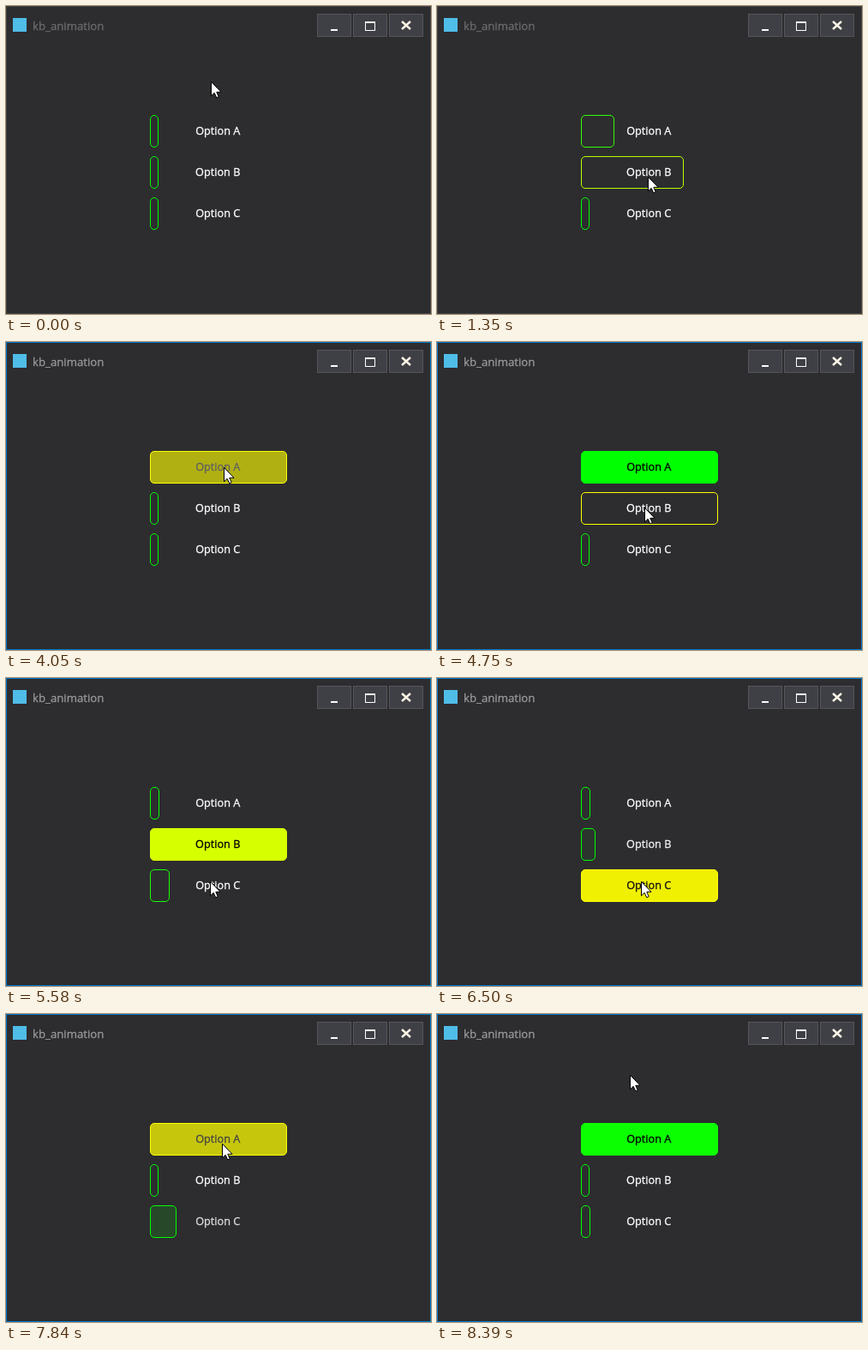
Animation, 496 px wide and 359 px high, one loop 8.62 s. Source, as an HTML page with a canvas:

```html
<!DOCTYPE html>
<html lang="en">
<head>
<meta charset="utf-8">
<title>kb_animation</title>
<style>
html, body { margin: 0; width: 100%; height: 100%; overflow: hidden; background: #2d2d30; }
canvas { display: block; width: 496px; height: 359px; }
</style>
</head>
<body>
<canvas id="stage"></canvas>
<script>
const W = 496, H = 359, LOOP = 8620, LAST_CHANGE = 8390, ACTIVATED = 3670;
const LEFT = 168, TOP = 127, PITCH = 48, BOX_H = 38;
const CLOSED = 10, OPEN = 160;
const HOVER = 350, UNCHECK = 460, FILL = 400, TINT = 450;
const FONT = '"Open Sans", "Noto Sans", sans-serif';

const canvas = document.getElementById('stage');
const ctx = canvas.getContext('2d');
const dpr = window.devicePixelRatio || 1;
canvas.width = W * dpr;
canvas.height = H * dpr;

const clamp = v => Math.max(0, Math.min(1, v));
const mix = (a, b, u) => a + (b - a) * u;
const easeOut = u => 1 - (1 - u) * (1 - u);
const smooth = u => u * u * (3 - 2 * u);
const progress = (t, start, span) => clamp((t - start) / span);

const moves = [
  { from: 50, to: 595, x: 245, y: 150 },
  { from: 1076, to: 1284, x: 247, y: 199 },
  { from: 1790, to: 2210, x: 249, y: 255 },
  { from: 2600, to: 3010, x: 255, y: 146 },
  { from: 4214, to: 4534, x: 243, y: 193 },
  { from: 5533, to: 5583, x: 239, y: 237 },
  { from: 6530, to: 6916, x: 253, y: 151 },
  { from: 7900, to: 8300, x: 226, y: 71 }
];

const clicks = [
  { time: 3802, index: 0 },
  { time: 5000, index: 1 },
  { time: 6130, index: 2 },
  { time: 7550, index: 0 }
];

const options = ['A', 'B', 'C'].map((letter, i) => ({
  label: `Option ${letter}`, y: TOP + i * PITCH, open: false, checked: false, resizes: []
}));

function pointerAt(t) {
  let x = 240, y = 88;
  for (const move of moves) {
    const u = smooth(progress(t, move.from, move.to - move.from));
    x = mix(x, move.x, u);
    y = mix(y, move.y, u);
  }
  return { x, y };
}

// Derive when each box opens and closes from the pointer and the clicks
function recordResizes() {
  for (let t = 0; t < LOOP; t += 2) {
    const { y } = pointerAt(t);
    const click = clicks.findLast(c => c.time <= t);
    options.forEach((option, i) => {
      const checked = click?.index === i;
      const hovered = y >= option.y && y < option.y + BOX_H;
      const open = checked || hovered;
      if (open !== option.open) {
        const unchecked = option.checked && !checked;
        option.resizes.push({
          time: t,
          width: open ? OPEN : unchecked ? CLOSED + 1 : CLOSED,
          span: unchecked ? UNCHECK : HOVER
        });
      }
      Object.assign(option, { open, checked });
    });
  }
}

function widthAt(resizes, t) {
  let width = CLOSED;
  resizes.forEach(({ time, width: end, span }, i) => {
    const until = Math.min(t, resizes[i + 1]?.time ?? LOOP);
    width = mix(width, end, easeOut(progress(until, time, span)));
  });
  return width;
}

function stateAt(index, t) {
  const width = widthAt(options[index].resizes, t);
  let fill = 0, red = clamp((width - CLOSED) / (OPEN - CLOSED));
  clicks.forEach(({ time, index: target }, i) => {
    const off = clicks[i + 1]?.time ?? LOOP;
    if (target !== index || t < time || t >= off + UNCHECK) return;
    if (t < off) {
      fill = progress(t, time, FILL);
      red = 1 - progress(t, time + FILL, TINT) ** 2;
    } else {
      fill = 1 - easeOut(progress(t, off, UNCHECK));
      red = 0;
    }
  });
  return { width, fill, red };
}

function rect(x, y, w, h, color) {
  ctx.fillStyle = color;
  ctx.fillRect(x, y, w, h);
}

function frame(x, y, w, h, color) {
  ctx.strokeStyle = color;
  ctx.lineWidth = 1;
  ctx.strokeRect(x + 0.5, y + 0.5, w - 1, h - 1);
}

function text(str, x, y, size, color, align) {
  ctx.font = `${size}px ${FONT}`;
  ctx.textAlign = align;
  ctx.fillStyle = ctx.strokeStyle = color;
  ctx.lineWidth = 0.3;
  ctx.fillText(str, x, y);
  ctx.strokeText(str, x, y);
}

function drawWindow(active) {
  rect(0, 0, W, H, '#2d2d30');
  frame(0, 0, W, H, active ? '#007acc' : '#434346');
  rect(8, 14, 16, 16, '#4fbde8');
  text('kb_animation', 31, 28, 13.2, active ? '#999999' : '#6b6b6b', 'left');

  for (let x = 363; x < 450; x += 42) {
    rect(x, 9, 40, 27, '#3f3f46');
    frame(x, 9, 40, 27, '#55555a');
  }
  rect(379, 27, 8, 2, '#ffffff');
  frame(419, 18, 12, 11, '#ffffff');
  rect(419, 18, 12, 2, '#ffffff');
  ctx.strokeStyle = '#fff5e6';
  ctx.lineWidth = 2.4;
  ctx.beginPath();
  ctx.moveTo(462, 18); ctx.lineTo(472, 27);
  ctx.moveTo(472, 18); ctx.lineTo(462, 27);
  ctx.stroke();
}

function drawOption({ label, y }, index, t) {
  const { width, fill, red } = stateAt(index, t);
  const color = `rgb(${Math.round(255 * red)},255,0)`;

  ctx.beginPath();
  ctx.roundRect(LEFT + 0.5, y + 0.5, Math.round(width) - 1, BOX_H - 1, 4.5);
  ctx.globalAlpha = fill;
  ctx.fillStyle = color;
  ctx.fill();
  ctx.globalAlpha = 1;
  ctx.strokeStyle = color;
  ctx.lineWidth = 1;
  ctx.stroke();

  const ink = Math.round(255 * (1 - fill));
  text(label, 247.2, y + 23, 12.7, `rgb(${ink},${ink},${ink})`, 'center');
}

function drawPointer({ x, y }) {
  ctx.save();
  ctx.translate(Math.round(x) - 0.5, Math.round(y) + 0.3);
  const arrow = new Path2D('M0 0V16.5L3.7 13L6.2 18.5L8.7 17.4L6.3 12H11.5Z');
  ctx.fillStyle = '#ffffff';
  ctx.fill(arrow);
  ctx.strokeStyle = '#000000';
  ctx.lineWidth = 1;
  ctx.stroke(arrow);
  ctx.restore();
}

function draw(t) {
  ctx.setTransform(dpr, 0, 0, dpr, 0, 0);
  drawWindow(t >= ACTIVATED);
  options.forEach((option, i) => drawOption(option, i, t));
  drawPointer(pointerAt(t));
}

recordResizes();
const began = performance.now();
function tick() {
  draw(Math.min((performance.now() - began) % LOOP, LAST_CHANGE));
  requestAnimationFrame(tick);
}
tick();
</script>
</body>
</html>
```
